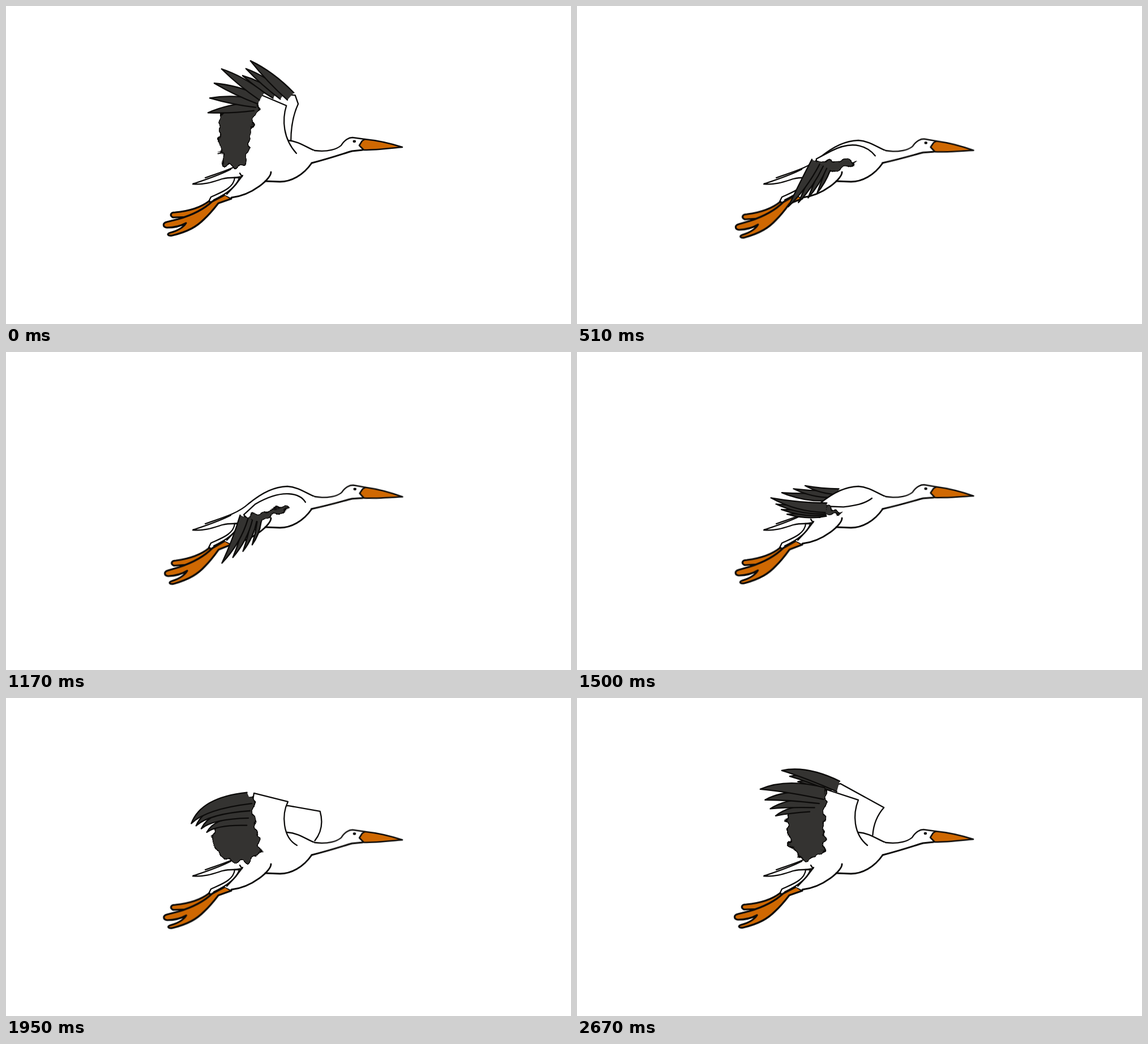
Recreate the animation shown at these times as an HTML page without scripts. Size 998 by 561 pixels, loop 2700 ms.

```html
<!DOCTYPE html>
<html lang="en">
<head>
<meta charset="utf-8">
<title>Flying stork</title>
<style>
html, body { margin: 0; width: 100%; height: 100%; overflow: hidden; background: #fff; }
svg { display: block; width: 100vw; height: 100vh; }
path { fill: none; stroke: #0c0b0a; stroke-width: 2.3; stroke-linejoin: round; stroke-linecap: round; }
.plain { fill: #fff; stroke: none; }
.arm { fill: #fff; }
.dark, .feather { fill: #343331; }
.orange { fill: #cf6802; stroke-width: 3.2; }
.bold { stroke-width: 2.9; }
.rough { filter: url(#ragged); }

.head, .legs { animation: .3375s cubic-bezier(.37, 0, .63, 1) infinite alternate; }
.head { transform-origin: 542px 264px; animation-name: nod; }
.legs { transform-origin: 390px 335px; animation-name: swing; }
@keyframes nod { to { transform: rotate(4.3deg); } }
@keyframes swing { to { transform: rotate(-4.4deg); } }

/* A fan starts at x, y; each next feather moves by dx, dy, turns by fan and shrinks by taper. */
@property --x { syntax: "<number>"; inherits: true; initial-value: 0; }
@property --y { syntax: "<number>"; inherits: true; initial-value: 0; }
@property --dx { syntax: "<number>"; inherits: true; initial-value: 0; }
@property --dy { syntax: "<number>"; inherits: true; initial-value: 0; }
@property --turn { syntax: "<number>"; inherits: true; initial-value: 0; }
@property --fan { syntax: "<number>"; inherits: true; initial-value: 0; }
@property --size { syntax: "<number>"; inherits: true; initial-value: 0; }
@property --taper { syntax: "<number>"; inherits: true; initial-value: 0; }
.feather {
  vector-effect: non-scaling-stroke;
  transform:
    translate(calc((var(--x) + var(--i) * var(--dx)) * 1px), calc((var(--y) + var(--i) * var(--dy)) * 1px))
    rotate(calc((var(--turn) + var(--i) * var(--fan)) * 1deg))
    scale(calc(var(--size) * (1 - var(--i) * var(--taper)) / 100));
}
.arm, .fan, .panel, .feather { animation: .675s linear infinite; }
.feather { animation-name: curl; }
.near.arm { animation-name: near-arm; }
.near.fan { animation-name: near-fan; }
.near.panel { animation-name: near-panel; }
.far.arm { animation-name: far-arm; }
.far.fan { animation-name: far-fan; }
.tip { animation: show-tip .675s step-end infinite; }
@keyframes show-tip { 0%, 62% { opacity: 0; } 35% { opacity: 1; } }

@keyframes curl {
  0%, 11.11%, 100% { d: path("M0 -9Q-55 -13 -100 0Q-50 9 0 9"); }
  22.22%, 73.33% { d: path("M0 -8Q-50 0 -100 0Q-50 17 0 9"); }
  88.89% { d: path("M0 -10Q-70 -32 -100 0Q-70 -12 0 9"); }
}

/* Poses in order: raised, falling, level, lowered, folded, lifting, opening */
@keyframes near-fan {
  0%, 100% { --x: 452; --y: 159; --dx: -5; --dy: 6; --turn: 34; --fan: -14; --size: 86; --taper: .02; }
  11.11% { --x: 455; --y: 194; --dx: -6; --dy: 4; --turn: 50; --fan: -13; --size: 98; --taper: .06; }
  22.22% { --x: 440; --y: 274; --dx: 0; --dy: 3; --turn: 10; --fan: -4; --size: 99; --taper: .1; }
  40% { --x: 430; --y: 310; --dx: 10; --dy: 7; --turn: -1; --fan: -13; --size: 84; --taper: .1; }
  73.33% { --x: 420; --y: 292; --dx: 9; --dy: 3; --turn: -65; --fan: -3; --size: 90; --taper: .18; }
  88.89% { --x: 430; --y: 177; --dx: -2; --dy: 14; --turn: -24; --fan: 3; --size: 112; --taper: .12; }
  95.56% { --x: 436; --y: 169; --dx: -9; --dy: 9; --turn: 3; --fan: -5; --size: 114; --taper: .16; }
}
@keyframes far-fan {
  0%, 100% { --x: 503; --y: 159; --dx: -14; --dy: -1; --turn: 41; --fan: -5; --size: 95; --taper: .15; }
  11.11% { --x: 484; --y: 191; --dx: -11; --dy: 3; --turn: 76; --fan: -7; --size: 80; --taper: .02; }
  22.22% { --x: 462; --y: 246; --dx: -7; --dy: 4; --turn: 10; --fan: -3; --size: 60; --taper: -.22; }
  40% { --x: 432; --y: 268; --dx: -11; --dy: 8; --turn: 4; --fan: 6; --size: 30; --taper: -.3; }
  73.33% { --x: 480; --y: 268; --dx: -5; --dy: 2; --turn: 0; --fan: 0; --size: 15; --taper: 0; }
  88.89% { --x: 430; --y: 188; --dx: -5; --dy: 8; --turn: 0; --fan: 0; --size: 40; --taper: 0; }
  95.56% { --x: 460; --y: 156; --dx: -10; --dy: 2; --turn: 15; --fan: -1; --size: 104; --taper: .25; }
}
@keyframes near-panel {
  0%, 100% { d: path("M448 160L380 187L376 235L384 282L424 282L426 250L433 215L444 180Z"); }
  11.11% { d: path("M455 193L385 200L382 228L399 272L414 275L426 250L434 225L445 200Z"); }
  22.22% { d: path("M440 272L385 276L395 286L412 288L440 286L466 284L458 281L450 277Z"); }
  40% { d: path("M418 293L412 325L445 346L475 354L528 340L551 318L541 287L478 298Z"); }
  73.33% { d: path("M420 290L405 325L425 325L450 298L471 289L500 275L488 273L452 286Z"); }
  88.89% { d: path("M436 172L390 182L362 250L380 278L402 289L428 289L452 270L436 210Z"); }
  95.56% { d: path("M439 166L380 170L370 220L378 262L398 285L414 285L435 272L436 195Z"); }
}
@keyframes near-arm {
  0%, 100% { d: path("M400 278L445 154L495 175C487 200 489 234 513 260"); }
  11.11% { d: path("M412 275L452 187L517 233C519 242 516 250 514 260"); }
  22.22% { d: path("M430 283L440 272L470 273C490 271 508 268 521 258"); }
  40% { d: path("M420 300L535 304L549 307C539 288 527 270 515 258"); }
  73.33% { d: path("M425 300L420 288L440 269C490 240 520 250 529 265"); }
  88.89% { d: path("M420 280L438 168L498 183C487 205 488 246 514 260"); }
  95.56% { d: path("M405 278L438 161L497 180C487 205 488 240 513 260"); }
}
@keyframes far-arm {
  0%, 100% { d: path("M480 155L511 157L516 172Q503 200 503 238"); }
  11.11% { d: path("M470 190L493 191L526 228Q524 234 522 243"); }
  22.22% { d: path("M460 247L465 244L480 242Q490 241 500 242"); }
  40%, 73.33% { d: path("M460 271L470 269L490 260Q505 259 515 261"); }
  88.89% { d: path("M470 190L500 191L555 200Q564 230 546 252"); }
  95.56% { d: path("M450 155L464 151L543 194Q525 214 523 242"); }
}
</style>
</head>
<body>
<svg viewBox="0 0 998 561">
  <defs>
    <filter id="ragged" filterUnits="userSpaceOnUse" x="250" y="80" width="400" height="350" color-interpolation-filters="sRGB">
      <feTurbulence type="fractalNoise" baseFrequency=".09" numOctaves="1" seed="4"/>
      <feDisplacementMap in="SourceGraphic" scale="20" xChannelSelector="R" yChannelSelector="G"/>
    </filter>
  </defs>

  <g>
    <path class="far arm" d="M480 155L511 157L516 172Q503 200 503 238"/>
    <g class="far fan">
      <path class="feather" style="--i:2"/>
      <path class="feather" style="--i:1"/>
      <path class="feather" style="--i:0"/>
    </g>
    <path class="tip dark" d="M543 279L556 292L560 300L552 305L546 296Z"/>
  </g>

  <g class="legs">
    <path class="orange" d="M359 344C342 357 322 362 299 364C290 364 289 370 295 373L330 372L364 350Z"/>
    <path class="orange" d="M387 333L364 345C348 360 325 370 304 376L284 381C276 383 277 390 284 391C298 391 309 388 318 383C313 391 301 397 290 400C283 402 286 406 293 405C322 398 337 389 350 376C361 366 368 357 375 348L398 340Z"/>
  </g>

  <g>
    <path class="plain" d="M352 303L428 268C455 246 475 237 497 237C516 238 530 249 548 256L540 277C525 300 500 310 484 310L458 309C440 325 420 334 398 339L386 333L362 341L404 303L330 314Z"/>
    <path d="M404 303C402 322 379 329 362 337L358 345M412 304C406 319 389 332 367 342"/>
    <path d="M418 299L405 316L390 332M403 303L417 301L413 295"/>
    <path d="M397 288C376 299 353 306 330 314C350 316 366 310 382 305Q394 302 411 303"/>
    <path d="M352 303C380 293 408 286 428 268C455 246 475 238 497 237C516 238 530 249 547 256"/>
    <path class="bold" d="M540 277C525 299 503 310 484 310L458 309"/>
    <path class="bold" d="M468 293C469 304 435 334 398 338"/>
  </g>

  <g class="head">
    <path class="plain" d="M542 255C570 258 585 253 592 246C598 236 606 232 612 232L634 235L630 254L618 255C600 259 575 268 540 277Z"/>
    <path d="M545 255C570 258 585 252 592 246C598 236 606 232 612 232L634 235"/>
    <path class="bold" d="M540 277C575 268 597 260 611 256L630 254"/>
    <path class="orange" style="stroke-width:2.5" d="M634 235C655 237 678 242 700 249C678 251 655 254 632 254L624 246L629 238Z"/>
    <ellipse cx="615.3" cy="238.8" rx="2.7" ry="2.3"/>
  </g>

  <g>
    <path class="near arm" d="M400 278L445 154L495 175C487 200 489 234 513 260"/>
    <g class="rough"><path class="near panel dark" d="M448 160L380 187L376 235L384 282L424 282L426 250L433 215L444 180Z"/></g>
    <g class="near fan">
      <path class="feather" style="--i:3"/>
      <path class="feather" style="--i:2"/>
      <path class="feather" style="--i:1"/>
      <path class="feather" style="--i:0"/>
    </g>
  </g>
</svg>
</body>
</html>
```
